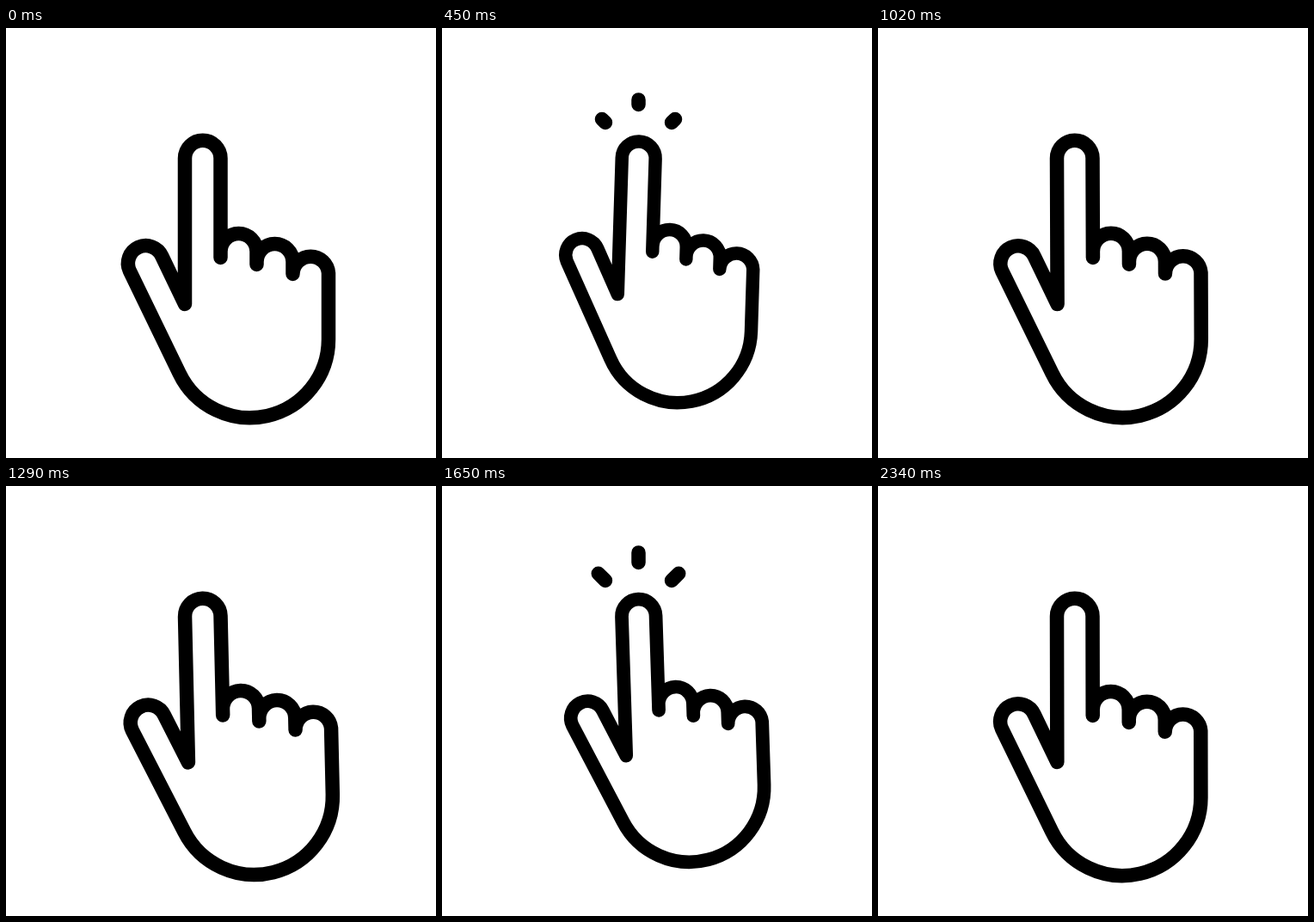
Recreate the animation shown at these times as an HTML page. Size 500 by 500 pixels, loop 2.37 s.

```html
<!DOCTYPE html>
<html lang="en">
<head>
<meta charset="utf-8">
<title>Tapping hand</title>
<style>
  html, body { margin: 0; width: 100%; height: 100%; overflow: hidden; background: #fff; }
  svg { display: block; width: 100vw; height: 100vh; }
  path { fill: none; stroke: #000; stroke-width: 16.5; stroke-linecap: round; stroke-linejoin: round; }
</style>
</head>
<body>
<svg viewBox="0 0 500 500">
  <path id="hand" d="M249.5 267V151.5A20.5 20.5 0 0 0 208 151.5V321L181.2 265.1
    A20.5 20.5 0 0 0 143.8 282.4L201.5 401.3A91.2 91.2 0 0 0 375 362V285
    A20.8 20.8 0 0 0 333.5 285V286V272A21 21 0 0 0 291.5 272V275V260A21 21 0 0 0 249.5 260"/>
  <path id="rays"/>
</svg>
<script>
const LOOP = 2370, TAP = LOOP / 2;
const PIVOT = { x: 228.5, y: 150 };
const RAY_LENGTH = 48;
const RAYS = [[228.5, 41, 90], [156, 76, 45], [301, 76, 135]];

const hand = document.getElementById('hand');
const rays = document.getElementById('rays');

// Eased progress from 0 to 1 between two times
function ease(t, from, to) {
  const p = Math.min(1, Math.max(0, (t - from) / (to - from)));
  return (1 - Math.cos(Math.PI * p)) / 2;
}

// Sway to one side and back, in quarter sine waves around the peak
function swing(t, start, peak, end) {
  const p = t < peak ? (t - start) / (peak - start) : (end - t) / (end - peak);
  return Math.sin(p * Math.PI / 2);
}

function angle(t) {
  return t < 975 ? 1.8 * swing(t, 0, 430, 975) : -1.85 * swing(t, 975, 1600, LOOP);
}

function press(t) {
  return 1 - 0.09 * (ease(t, 303, 403) - ease(t, 403, 530));
}

function rayPath(t) {
  const inner = RAY_LENGTH * (1 - ease(t, 590, 700));
  const outer = RAY_LENGTH * (1 - ease(t, 418, 562));
  if (inner - outer < 0.05) return '';
  return RAYS.map(([x, y, deg]) => {
    const a = deg * Math.PI / 180;
    const at = d => (x + d * Math.cos(a)).toFixed(2) + ' ' + (y + d * Math.sin(a)).toFixed(2);
    return 'M' + at(inner) + 'L' + at(outer);
  }).join('');
}

function draw(now) {
  const t = now % LOOP, tap = t % TAP;
  const { x, y } = PIVOT;
  hand.setAttribute('transform',
    `translate(${x} ${y}) rotate(${angle(t)}) scale(${press(tap)}) translate(${-x} ${-y})`);
  rays.setAttribute('d', rayPath(tap));
}

let start = null;
function tick(now) {
  if (start === null) start = now;
  draw(now - start);
  requestAnimationFrame(tick);
}
draw(0);
requestAnimationFrame(tick);
</script>
</body>
</html>
```
